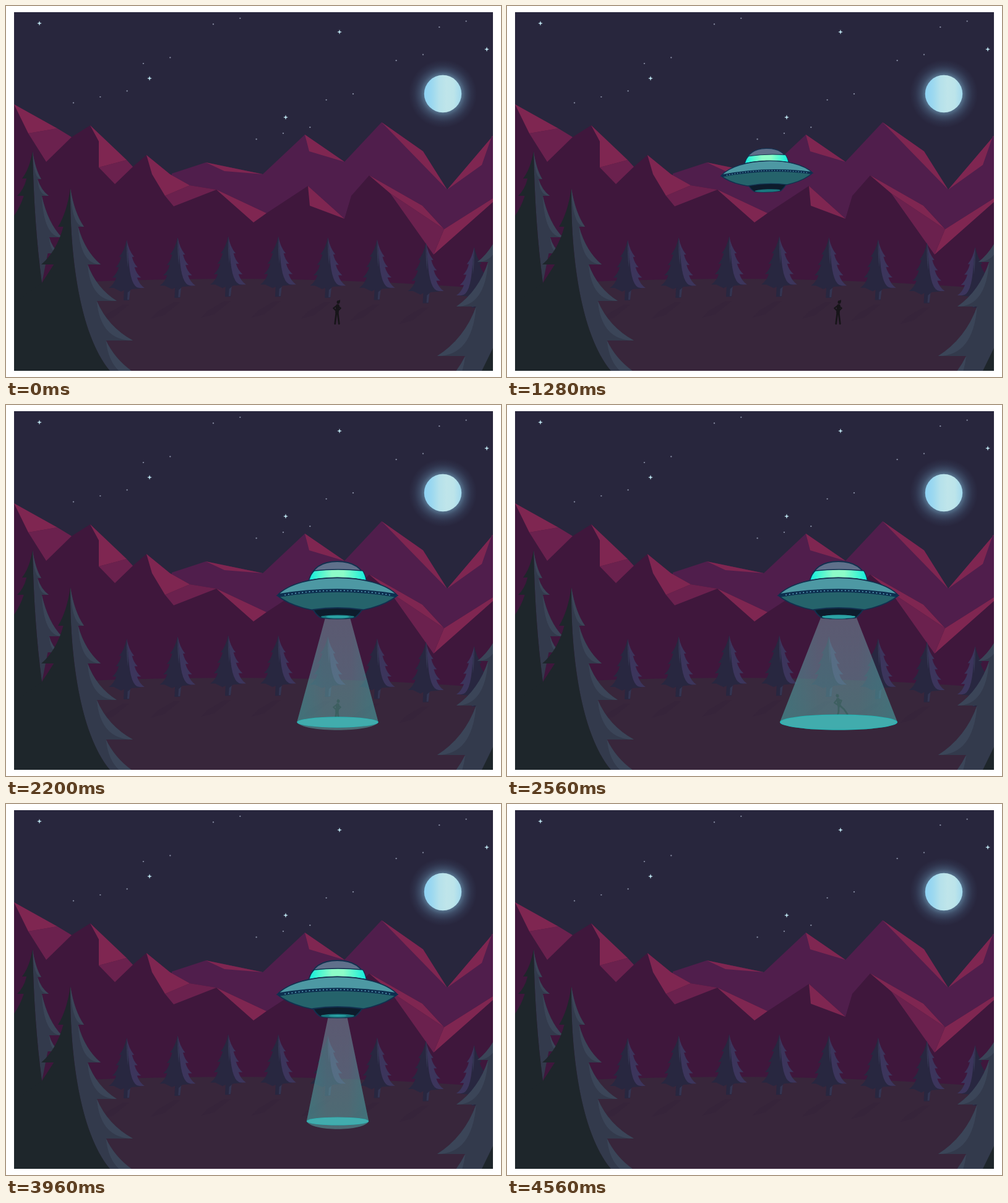
Recreate the animation shown at these times as an HTML page with a canvas. Size 800 by 600 pixels, loop 4.8 s.

```html
<!DOCTYPE html>
<html lang="en">
<head>
<meta charset="utf-8">
<title>Night visitor</title>
<style>
html, body { margin: 0; width: 100%; height: 100%; overflow: hidden; background: #fff; }
canvas { display: block; }
</style>
</head>
<body>
<canvas id="stage" width="800" height="600"></canvas>
<script>
const g = document.getElementById('stage').getContext('2d');
const LOOP = 4800, STEP = 40, HOVER = [535.5, 300];
const LIGHT = '#7f2651', MID = '#6b214e', NEAR = '#3f173c', FAR = '#501e4c';
const BARK = '#1e262b', LEAF = '#333a4c', RIM = '#3b4558', INK = '#171519', NAVY = '#12304f';

const span = (t, from, to) => Math.min(1, Math.max(0, (t - from) / (to - from)));
const lerp = (a, b, p) => a + (b - a) * p;
const smooth = p => p * p * (3 - 2 * p);
const bezier = (a, b, c, d, p) =>
  a * (1 - p) ** 3 + 3 * b * p * (1 - p) ** 2 + 3 * c * p * p * (1 - p) + d * p ** 3;

function shape(d, fill, stroke, width = 1.8) {
  const path = new Path2D(d);
  if (fill) { g.fillStyle = fill; g.fill(path); }
  if (stroke) { g.strokeStyle = stroke; g.lineWidth = width; g.stroke(path); }
}

function oval(x, y, rx, ry, fill) {
  g.fillStyle = fill;
  g.beginPath();
  g.ellipse(x, y, rx, ry, 0, 0, 7);
  g.fill();
}

function gradient(grad, ...colors) {
  colors.forEach((c, i) => grad.addColorStop(i / (colors.length - 1), c));
  return grad;
}

function sky() {
  g.fillStyle = '#28263d';
  g.fillRect(13, 10, 774, 580);
  for (let i = 1; i <= 18; i++)
    oval(13 + 774 * (i * .618 % 1), 15 + 240 * (i * .755 % 1), 1.2, 1.1, '#858aa0');
  for (const [x, y] of [[54, 28], [539, 42], [777, 70], [232, 117], [452, 180]])
    shape(`M${x} ${y - 4}l1 3 3 1-3 1-1 3-1-3-3-1 3-1z`, '#b9deea');
}

function moon() {
  oval(706, 142, 55, 55, gradient(g.createRadialGradient(706, 142, 28, 706, 142, 55),
    'rgba(135,195,225,.56)', 'rgba(120,175,210,.27)', 'rgba(100,150,190,.1)', 'rgba(90,130,170,0)'));
  oval(706, 142, 30.2, 30.2, gradient(g.createLinearGradient(676, 0, 736, 0),
    '#8fd2f3', '#9bd8f0', '#b5e1eb', '#bfe5ea', '#bce4ea', '#a3daee'));
}

function mountains() {
  shape('M268 271L323 253 415 272 483 208 547 252 607 188 674 235 713 297 787 210V460H268z', FAR);
  shape('M323 253L415 272 353 267zM483 208L547 252 490 235zM607 188L674 235 713 297zM713 297L769 257 785 211 787 210z', LIGHT);
  shape('M13 159L106 212 136 193 205 260 227 241 265 272 297 290 340 297 421 335 488 291 547 344 558 307 587 274 673 323 708 361 787 311V470H13z', NEAR);
  shape('M83 198L106 212 65 252 36 206zM195 249L205 260 176 288 150 261zM297 290L340 297 271 324 257 307zM621 303L708 361 691 402z', MID);
  shape('M13 159L83 198 36 206zM136 193L195 249 150 261V219zM227 241L265 272 297 290 257 307 236 272zM340 297L421 335 400 350zM488 291L547 344 491 323zM587 274L673 323 708 361 621 303zM708 361L787 311V317L691 402z', LIGHT);
  shape('M13 452Q400 428 787 458V590H13z', '#38263b');
}

// One side of a fir: swooping tiers from the apex to each tip, closed by a tail path
function fir([ax, ay], tips, tail, fill, rim, notch = .57) {
  let x = ax, y = ay, side = `M${ax} ${ay}`, rims = '';
  for (const [tx, ty] of tips) {
    const swoop = `Q${lerp(x, tx, .3)} ${lerp(y, ty, .65)} ${tx} ${ty}`;
    side += `${swoop}L${lerp(ax, tx, notch)} ${ty}`;
    rims += `M${x} ${y}${swoop}Q${lerp(x, tx, .1)} ${ty} ${x} ${y}z`;
    [x, y] = [lerp(ax, tx, notch), ty];
  }
  shape(side + tail, fill);
  if (rim) shape(rims, rim);
}

function pines() {
  const tips = side => [1, 2, 3, 4].map(i => [side * (6.5 + 5.6 * i), 11 + 16.8 * i]);
  for (let i = 0; i < 8; i++) {
    const x = 195 + 82.7 * i - .35 * i * i;
    g.save();
    g.translate(x, 372 + .00014 * (x - 400) ** 2);
    if (i === 7) g.scale(-1, 1);
    shape('M-6 105H4L-22 126-44 132-32 120z', 'rgba(45,32,56,.18)');
    shape('M-4 78H5L4 98H-5z', '#282740');
    shape('M2 80H6L4 97H1z', '#343552');
    fir([0, 0], tips(-1), 'L-9 84-3 81 2 85 8 80 22 79 6 30z', '#282740', null, .72);
    fir([0, 0], tips(1), 'Q6 78 3 30z', '#3c355c', null, .72);
    shape('M0 0Q1 15 3 25L2 45Q-1 25 0 0z', '#343552');
    g.restore();
  }
}

function frontTrees() {
  const rear = [43, 235], front = [104, 295];
  const rearSpine = 'L58 448Q45 350 43 235z', frontSpine = 'L168 590C118 530 103 400 104 295z';
  fir(rear, [[57, 280], [69, 307], [90, 374], [86, 400]], rearSpine, LEAF, RIM);
  fir(rear, [[26, 279], [18, 307], [-8, 360]], 'H13V590H80' + rearSpine, BARK);
  fir(front, [[126, 357], [153, 418], [179, 477], [205, 541], [228, 605]], frontSpine, LEAF, RIM);
  fir(front, [[84, 357], [57, 418]], 'L58 448 13 480V590' + frontSpine, BARK);
  fir([802, 350], [[762, 414], [728, 486], [697, 566], [665, 640]], 'H802z', LEAF, RIM);
  shape('M787 553L769 590H787z', BARK);
}

function limb(x, y, length, angle, bend, width) {
  g.lineWidth = width;
  g.beginPath();
  g.moveTo(x, y);
  for (const a of [angle, angle + bend])
    g.lineTo(x += length * Math.sin(a), y += length * Math.cos(a));
  g.stroke();
}

function person(t) {
  if (t >= 3600) return;
  const lift = span(t, 2400, 3160), turn = span(t, 1640, 1880);
  const spread = .12 + .3 * Math.sin(Math.PI * Math.sqrt(lift));
  g.save();
  g.translate(535 + 9 * lift, 495 - 42 * lift - 80 * span(t, 3160, 3600) ** 1.3);
  g.rotate(-1.45 * lift);
  g.globalAlpha = 1 - span(t, 3440, 3600);
  g.strokeStyle = INK;
  g.lineCap = g.lineJoin = 'round';
  for (const side of [-1, 1]) {
    limb(side, -10, 6, side * lerp(.9, 1.4, lift), -side * 1.7, 2.2);
    limb(side, 0, 9.5, side * spread + lift * .5, -lift * 1.1, 2.8);
  }
  shape('M1-10L0 0', null, INK, 5.5);
  oval(2, -16, 2.5, 2.8, INK);
  shape(`M0-17l${5 - 3 * turn}-3 0 4z`, INK);
  g.restore();
}

function beam(k) {
  if (k <= 0) return;
  const cone = 'M-28.5 343L-95 513C-80 530 80 530 95 513L28.5 343z';
  g.save();
  g.translate(536, 0);
  g.save();
  g.scale(k, 1);
  shape(cone, gradient(g.createLinearGradient(0, 343, 0, 526),
    'rgba(125,168,176,.46)', 'rgba(116,176,180,.46)', 'rgba(100,188,182,.46)'));
  shape(cone, gradient(g.createLinearGradient(-95, 0, 95, 0),
    'rgba(40,130,135,.35)', 'rgba(40,130,135,0)', 'rgba(40,130,135,0)', 'rgba(40,130,135,.35)'));
  g.restore();
  oval(0, 513, 95 * k, 12.5 * k, '#25b5b5');
  oval(0, 513, 93 * k, 11.3 * k, '#41acad');
  g.restore();
}

function ufo([x, y, size, tilt], lit) {
  g.save();
  g.translate(x, y);
  g.rotate(tilt);
  g.scale(size, size);
  shape('M-46-16Q-38-47 0-47Q38-47 47-16z', '#5f708b', NAVY);
  shape('M-46-16Q-43-27-37-32Q0-36 41-32Q45-26 47-16z',
    gradient(g.createLinearGradient(-46, 0, 47, 0), '#10eadf', '#4ff7d0', '#8dfcc8', '#8dfcc8', '#4ff7d0', '#10eadf'), NAVY, 1.3);
  shape('M-97 8C-62-30 62-30 97 8C55 44-55 44-97 8z', '#25636b', NAVY);
  shape('M-97 8C-62-30 62-30 97 8Q0-9-97 8z', '#4d98a3', NAVY, 1.5);
  shape('M-95 8Q0-8 95 8', null, '#0d2f50', 5.5);
  for (let i = -15; i <= 15; i++) {
    const u = i / 16;
    oval(90 * u, 8 * u * u, .9, .9, '#68b9d0');
  }
  shape('M-39 31Q0 25 40 31Q34 40 28 44Q0 47-27 44Q-34 40-39 31z', '#0d1c2c', NAVY);
  oval(0.5, 42.5, 27, 3, '#19777e');
  oval(0.5, 42.5, 27 * lit, 3 * lit, '#2ba3a5');
  g.restore();
}

function ufoPose(t) {
  if (t < 280 || t >= 4560) return null;
  if (t < 840) {
    const p = span(t, 280, 840);
    return [lerp(677, 284, p), 142, lerp(.06, .14, p), -.2 * p];
  }
  if (t < 4160) {
    const p = span(t, 840, 1520);
    return [bezier(284, 61, 558, HOVER[0], p), bezier(146, 179, 305, HOVER[1], p),
      lerp(.17, 1, smooth(p)), -.25 * (1 - p) ** 2];
  }
  const p = span(t, 4160, 4560) ** 2;
  return [lerp(HOVER[0], -80, p), lerp(HOVER[1], -40, p), lerp(1, .65, p), .1 * p];
}

function beamWidth(t) {
  return 1 - (t < 3600 ? 1 - span(t, 1920, 2480) : span(t, 3600, 4160)) ** 1.7;
}

function draw(t) {
  const pose = ufoPose(t), far = t < 840, k = beamWidth(t);
  g.save();
  g.beginPath();
  g.rect(13, 10, 774, 580);
  g.clip();
  sky();
  if (pose && far) ufo(pose, 0);
  moon();
  mountains();
  pines();
  person(t);
  frontTrees();
  beam(k);
  if (pose && !far) ufo(pose, k);
  g.restore();
}

const start = performance.now();
function tick() {
  const t = (performance.now() - start) % LOOP;
  draw(Math.floor(t / STEP) * STEP);
  requestAnimationFrame(tick);
}
tick();
</script>
</body>
</html>
```
